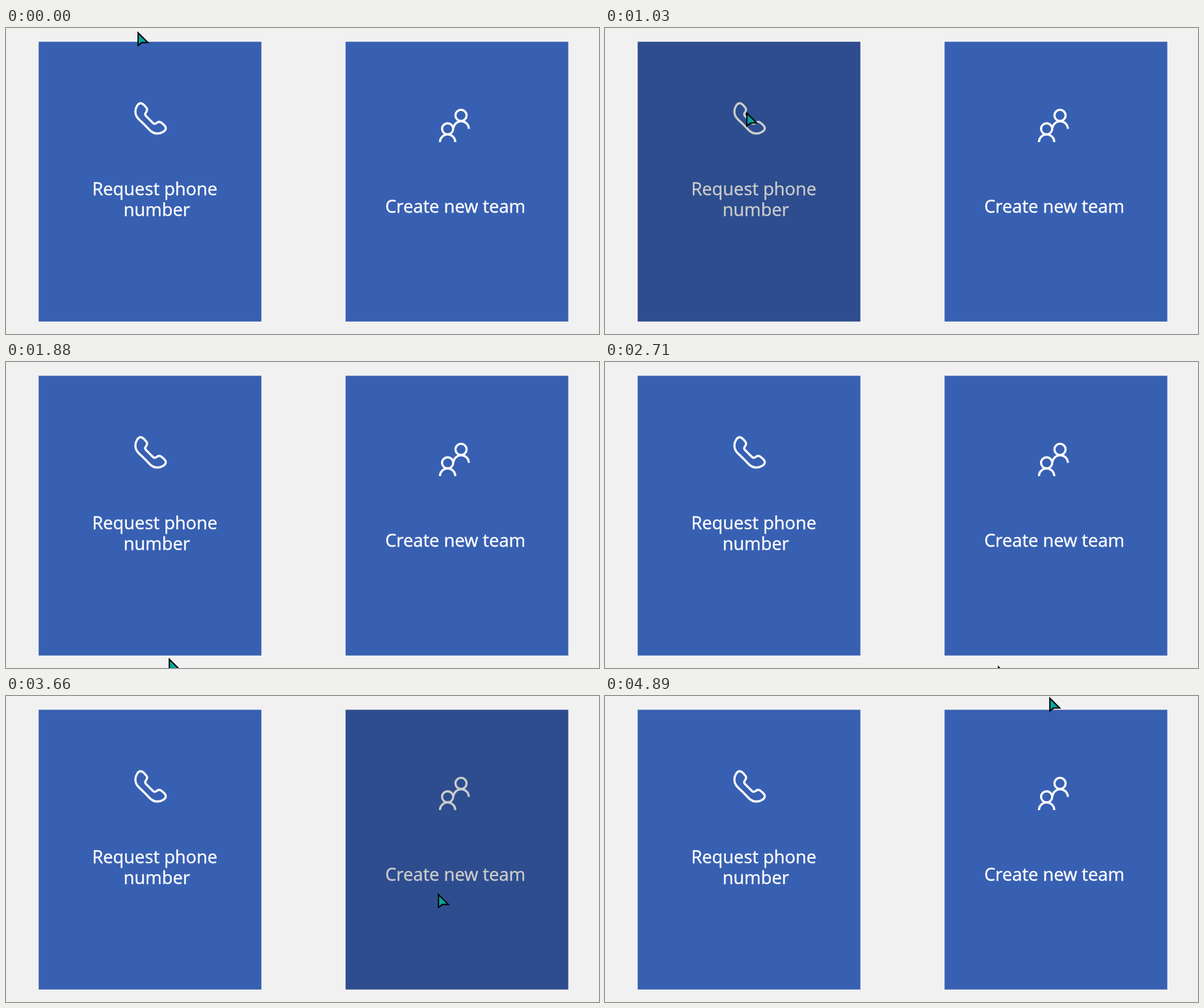
Recreate the animation shown at these times as an HTML page. Size 912 by 472 pixels, loop 5.35 s.

```html
<!DOCTYPE html>
<html lang="en">
<head>
<meta charset="utf-8">
<title>Hover cards</title>
<style>
  html, body { margin: 0; height: 100%; overflow: hidden; background: #f1f1f1; }
  svg { display: block; width: 100%; height: 100%; }
  .card { --fill: #3860b2; --ink: #fff; }
  .card.hover { --fill: #2d4d8e; --ink: #ccc; }
  rect { fill: var(--fill); }
  text {
    fill: var(--ink); stroke: var(--ink); stroke-width: .4;
    font: 27.3px "Open Sans", sans-serif; text-anchor: middle;
  }
  .icon { fill: none; stroke: var(--ink); stroke-width: 3.3; }
</style>
</head>
<body>
<svg viewBox="0 0 912 472">
  <g class="card">
    <rect x="50.25" y="21.25" width="342.5" height="431.5"/>
    <g class="icon">
      <path id="half" d="M212.8 149L204 140.5C200.5 137 199 134 199 129C199 122 203.5 116 207 116
        C209 116 210.5 117 212 118.5L215.8 122.8C218 125.5 217.5 127.5 215 130.5
        C213.5 132.5 213.5 134 215.5 136L220.7 141.1"/>
      <use href="#half" transform="matrix(0 -1 -1 0 361.75 361.75)"/>
    </g>
    <text x="228.8" y="258">Request phone</text>
    <text x="231.9" y="290">number</text>
  </g>
  <g class="card">
    <rect x="522.25" y="21.25" width="342.5" height="431.5"/>
    <g class="icon">
      <circle cx="699.8" cy="134.8" r="8.6"/>
      <circle cx="679.2" cy="155.6" r="8.6"/>
      <path d="M667.4 176a11.8 11.8 0 0 1 23.6 0M688.3 154a11.8 11.8 0 0 1 23.5 1.5"/>
    </g>
    <text x="691" y="285">Create new team</text>
  </g>
  <path id="cursor" d="M1.2 2.5V22L7 17.6H16.3Z" fill="#08a6a0" stroke="#000" stroke-width="2"/>
</svg>
<script>
const LOOP = 5350, STEP = 77.4; // ms; the pointer is sampled once per step

// Pointer route: step, x, y
const route = [
  [0, 202, 5], [4, 202, 6], [6, 200, 21], [11, 215, 85], [19, 220, 326],
  [21, 238, 422], [24, 250, 456], [26, 250, 456], [35, 604, 468],
  [41, 611, 436], [47, 664, 304], [55, 705, 86], [60, 686, 22], [63, 683, 1],
];

const slope = (i, axis) => i < 1 || i >= route.length ? 0
  : (route[i][axis] - route[i - 1][axis]) / (route[i][0] - route[i - 1][0]);

function tangent(i, axis) {
  const a = slope(i, axis), b = slope(i + 1, axis);
  return a * b > 0 ? 2 * a * b / (a + b) : 0;
}

// Monotone cubic through the route
function position(step, axis) {
  const i = route.findIndex(point => point[0] > step);
  if (i < 0) return route.at(-1)[axis];
  const [from, to] = [route[i - 1], route[i]];
  const span = to[0] - from[0], u = (step - from[0]) / span, v = 1 - u;
  return Math.round(from[axis] * v * v * (1 + 2 * u) + to[axis] * u * u * (3 - 2 * u)
    + span * u * v * (v * tangent(i - 1, axis) - u * tangent(i, axis)));
}

const cursor = document.getElementById("cursor");
const cards = document.querySelectorAll(".card");
const began = performance.now();

function draw(now) {
  const step = Math.floor(Math.max(0, now - began) % LOOP / STEP);
  const x = position(step, 1), y = position(step, 2);
  cursor.setAttribute("transform", `translate(${x} ${y})`);
  cards.forEach((card, i) => {
    const left = 50 + 472 * i;
    card.classList.toggle("hover", x >= left && x < left + 343 && y >= 21 && y < 453);
  });
  requestAnimationFrame(draw);
}
draw(began);
</script>
</body>
</html>
```
